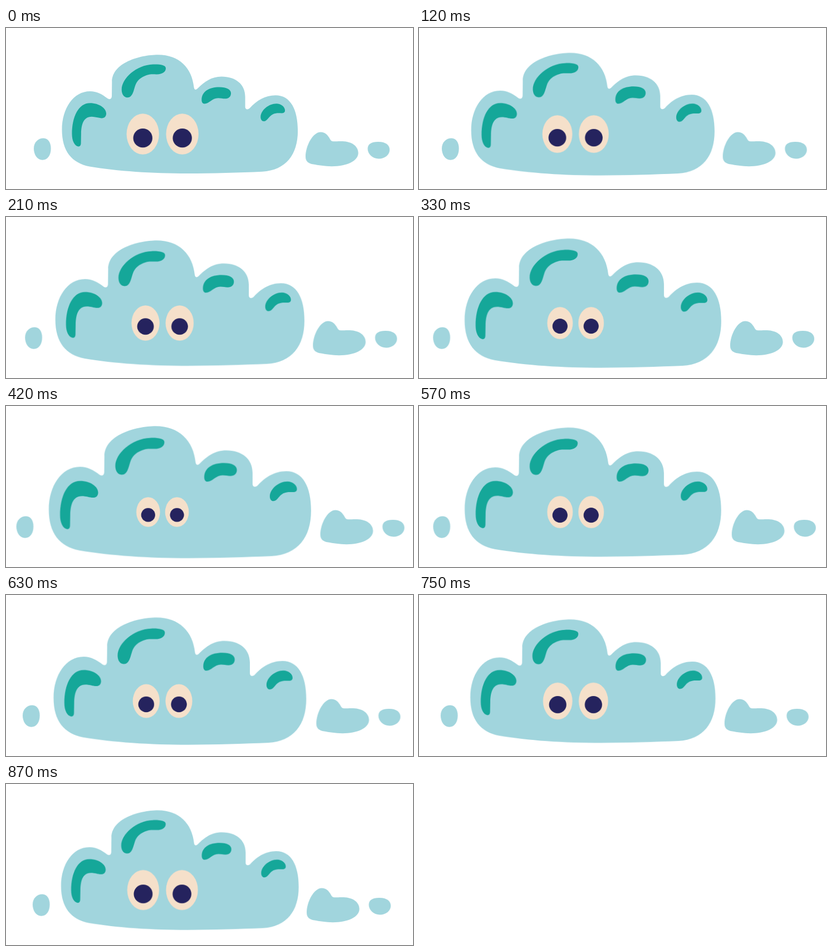
Animation of 731 by 290 pixels, one loop 0.9 s. Source, as an HTML page:

```html
<!DOCTYPE html>
<html lang="en">
<head>
<meta charset="utf-8">
<title>Breathing cloud</title>
<style>
  html, body { margin: 0; width: 100%; height: 100%; overflow: hidden; background: #fff; }
  svg { display: block; width: 731px; height: 290px; }

  .sky { fill: #a1d5dd; }
  .shine { fill: #15a799; }
  .white { fill: #f5e0ca; }
  .pupil { fill: #25235e; }

  .move { animation: 900ms linear infinite; }
  .body { animation-name: swell; transform-origin: 311px 155px; }
  .shine { animation-name: swell; transform-origin: 309.2px 138.5px; }
  .eyes { animation-name: shrink; transform-origin: 281.2px 191px; }
  .left { animation-name: drift-left; }
  .right { animation-name: drift-right; }

  @keyframes swell { 50% { transform: scale(1.12); } }
  @keyframes shrink { 50% { transform: scale(.71); } }
  @keyframes drift-left { 50% { transform: translateX(-33.6px); } }
  /* the right puffs turn back slightly later, at 480 ms */
  @keyframes drift-right { 53.3333% { transform: translateX(30.3px); } }
</style>
</head>
<body>
<svg viewBox="0 0 731 290">
  <path class="sky move left" d="M67.5 198.5C76 198.5 80.7 207 80.7 217C80.7 229 75 237.7 65.5 237.7C56 237.7 50 228 50 217C50 206 57.5 198.5 67.5 198.5Z"/>

  <g class="sky move right">
    <path d="M565 187.5C573 187.5 578 193 581.5 199.5C583 202.5 584.5 204.2 588 204.2C594 204.2 598 203.8 604 204C622 204.5 632.6 213.5 632.6 225C632.6 240 611 249.2 585 249.2C572 249.2 560 247 552 245.6C543 244 538 240.5 538 232C538 212 551 187.5 565 187.5Z"/>
    <path d="M668 205C682 204.8 689 211 689 219.5C689 228.5 680 235.5 669.5 235.5C658 235.5 649.5 227 649.5 217.5C649.5 209 656 205.2 668 205Z"/>
  </g>

  <path class="sky move body" d="M190 122C190 128 186 129.5 182.5 127C172 119 163 114 151 114C121 114 100.5 145 100.5 183C100.5 222 118 243 150 249.5C200 258 262 262 326 262C370 262 420 260.5 460 258.8C503 256 524 228 524 185C524 147 511 121.3 484 121.3C465 121.3 450 131 438 144C434.5 148 429.5 147 429.5 142V124C429.5 101 412 87.5 387 87.5C369 87.5 356 97 345 108C341 112 338.5 112 337.5 107C334 72 311 48.3 273 48.3C240 48.3 190.3 63 190.3 97Z"/>

  <g class="shine move">
    <path d="M151 135.3C167 135.3 180 144.5 180 154C180 159.5 176.5 162.6 171.5 162.4C166.5 162.2 160 159.8 154 159.8C138 159.8 135.3 176 134.9 190L134.6 207C134.6 211.5 132.8 213.6 130 213.4C123 212.5 118.5 203 118.5 191C118.5 160 130 135.3 151 135.3Z"/>
    <path d="M264 65.6C276 65.2 287 66.5 287 72.5C287 79 281 83.2 271 83.4C263 83.5 258 82.5 249 86.5C240 90.5 235 95.5 232 104C229 113 227.5 125.2 218 125.2C211.5 125.2 207.7 119 207.7 111C207.7 91 234 66.6 264 65.6Z"/>
    <path d="M383 106.4C396 106.4 404 110.5 404 117.5C404 124 399.5 127.3 393.5 127.3C389 127.3 386 126.2 381 126.2C370 126.2 364.5 136.5 356.5 136.5C353 136.5 351.3 133.5 351.3 129.5C351.3 114 365 106.4 383 106.4Z"/>
    <path d="M485.5 136.2C494 136.2 501 142 501 148.5C501 152 498.5 153.4 495 153.4C489 153.4 484.5 152.8 479 155.5C471 159.5 469.5 168 463 168C459.5 168 457.2 164.5 457.2 160.5C457.2 148 472 136.2 485.5 136.2Z"/>
  </g>

  <g class="move eyes">
    <g class="white">
      <ellipse cx="245.7" cy="191" rx="29.2" ry="36.8"/>
      <ellipse cx="316.7" cy="191" rx="29.2" ry="36.8"/>
    </g>
    <g class="pupil">
      <circle cx="245.7" cy="198.2" r="17.2"/>
      <circle cx="316.7" cy="198.2" r="17.2"/>
    </g>
  </g>
</svg>
</body>
</html>
```
